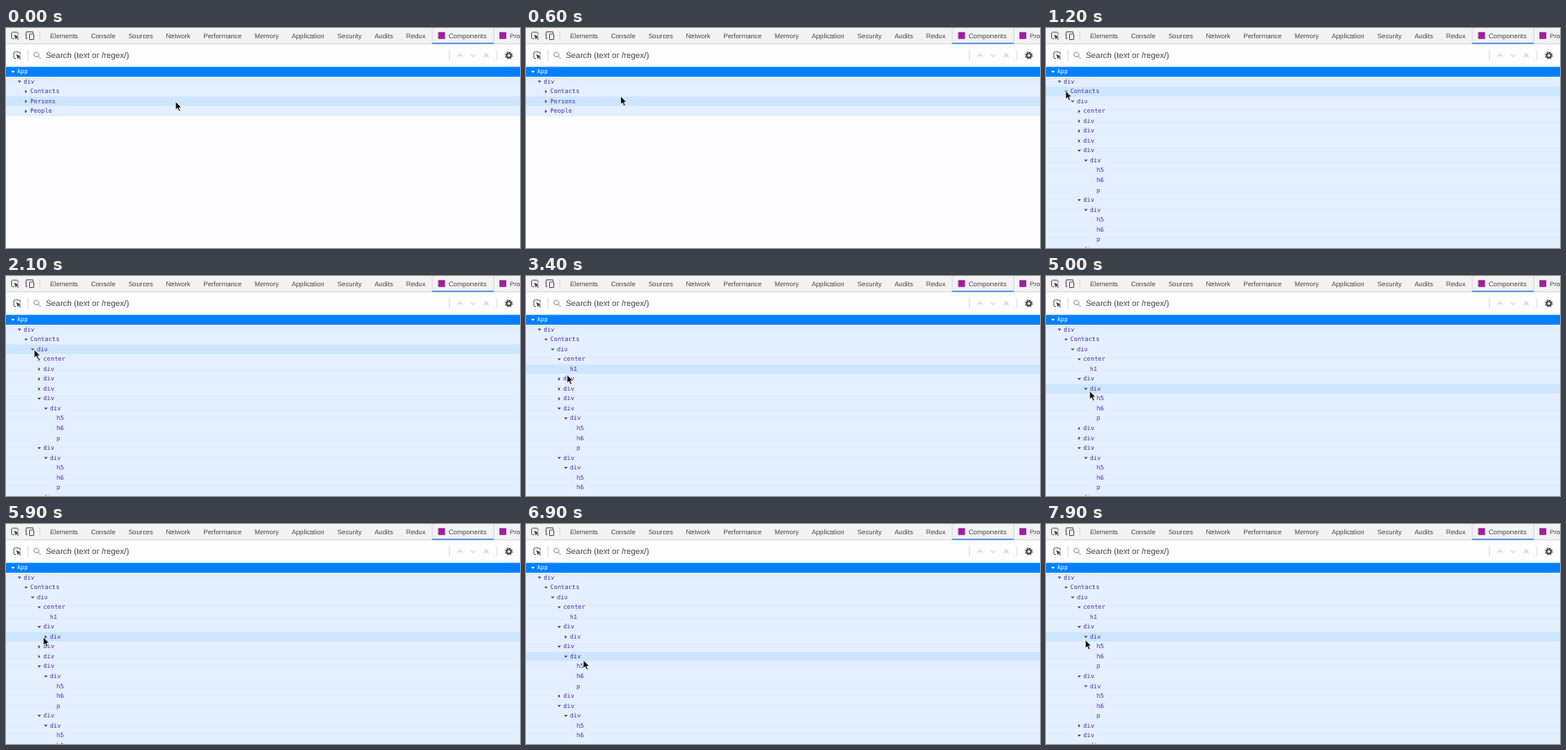
Write an HTML page that moves like this. It is 600 px wide and 257 px high and loops after 8000 ms.

```html
<!DOCTYPE html>
<html lang="en">
<head>
<meta charset="utf-8">
<title>Component tree</title>
<style>
  html, body { margin: 0; width: 100%; height: 100%; overflow: hidden; background: #fdfdff; }
  svg { display: block; width: 100vw; height: 100vh; }
  text { text-rendering: geometricPrecision; }
  .ui { font-family: "Liberation Sans", Arial, sans-serif; fill: #474749; }
  #tabs { font-size: 7.8px; }
  #tree { font: 7.12px "DejaVu Sans Mono", monospace; fill: #4f30a6; }
  .icon { fill: none; stroke: #5f6164; stroke-width: 1; }
  .pale { stroke: #bfc1c4; }
  .rule { stroke: #d0d0d2; stroke-width: .7; }
</style>
</head>
<body>
<svg viewBox="0 0 600 257">
  <defs>
    <g id="inspect">
      <path class="icon" d="M8 3.2V1.6Q8 .5 7 .5H1.5Q.5 .5 .5 1.5V7Q.5 8 1.5 8H3.2"/>
      <path d="M3.4 3.2L9.4 5.5 7 6.3 9 8.5 8.2 9.3 6.2 7.1 5.3 9.3Z" fill="#4c4e51"/>
    </g>
    <path id="chevron" class="icon pale" d="M-2.8 1.5L0 -1.5 2.8 1.5"/>
    <rect id="badge" width="8" height="8" fill="#a01e9c"/>
  </defs>

  <rect width="600" height="18.5" fill="#f3f3f4"/>
  <rect y="18" width="600" height=".8" fill="#cbcccf"/>
  <path class="rule" d="M497.5 0V18M569.5 0V18"/>
  <rect x="497.5" y="17.3" width="72" height="1.5" fill="#2b7de9"/>
  <rect y="18.8" width="600" height="27" fill="#fdfdfe"/>

  <use href="#inspect" x="6" y="4.5"/>
  <path class="icon" d="M25 12.5H23.5V4.5H31.5V6.5M27.5 7H32.5V13.5H27.5Z"/>
  <path class="rule" d="M39.5 4V14M25.5 26V38M517.5 26V38M573 26V38"/>
  <text id="tabs" class="ui" x="51.5" y="11.9"></text>
  <use href="#badge" x="504.5" y="4.8"/>
  <use href="#badge" x="576" y="4.8"/>

  <use href="#inspect" x="8.5" y="27.5"/>
  <g class="icon" style="stroke:#929497">
    <circle cx="35.5" cy="31" r="2.8"/><path d="M37.5 33L40.5 36"/>
  </g>
  <text class="ui" x="46.5" y="35.4" font-size="9.5">Search (text or /regex/)</text>
  <use href="#chevron" transform="translate(530.3 32)"/>
  <use href="#chevron" transform="translate(545.3 32) scale(1 -1)"/>
  <path class="icon pale" d="M558.2 29.5l5 5m0 -5l-5 5"/>
  <g fill="none" stroke="#55575a">
    <circle cx="587" cy="32" r="2.5" stroke-width="2"/>
    <circle cx="587" cy="32" r="3.8" stroke-width="1.4" stroke-dasharray="1.7 1.284"/>
  </g>

  <g id="tree"></g>
  <path id="cursor" d="M0 0V9.6L2.2 7.6 3.8 11.2 5.5 10.4 3.9 7H6.9Z" fill="#000" stroke="#fff" stroke-width=".7"/>
</svg>

<script>
const DURATION = 8000, STEP = 100, TRAVEL = 600;
const TOP = 45.4, ROW = 11.53, INDENT = 7.7;
const TAB_GAP = 15.15, BADGE_SPACE = 12;

const tabs = ["Elements", "Console", "Sources", "Network", "Performance", "Memory",
  "Application", "Security", "Audits", "Redux", "Components", "Profiler"];
const badged = ["Components", "Profiler"];

// Where the pointer comes to rest: arrival time, x, y
const stops = [[0, 198, 86], [900, 23, 73.5], [1800, 33, 86], [2900, 39, 97],
  [3400, 48, 115.5], [3900, 39, 120], [5000, 51, 134.5], [5200, 44, 131],
  [6400, 38, 146], [6600, 38, 146], [6900, 67, 159], [7700, 46, 135.5]];

const tree = document.getElementById("tree");
const cursor = document.getElementById("cursor");

document.getElementById("tabs").innerHTML = tabs.map((name, i) => {
  const gap = i && TAB_GAP + (badged.includes(name) ? BADGE_SPACE : 0);
  return `<tspan dx="${gap}">${name}</tspan>`;
}).join("");

function pointerAt(time) {
  const next = stops.findIndex(([arrival]) => arrival > time);
  if (next < 0) return stops.at(-1).slice(1);
  const [left, x0, y0] = stops[next - 1], [arrival, x1, y1] = stops[next];
  const start = Math.max(left, arrival - TRAVEL);
  const p = Math.max(0, (time - start) / (arrival - start));
  const eased = p * p * (3 - 2 * p);
  return [x0 + (x1 - x0) * eased, y0 + (y1 - y0) * eased];
}

const node = (name, children = [], open = true) => ({ name, children, open });

function card(open = true, innerOpen = true) {
  return node("div", [node("div", ["h5", "h6", "p"].map(tag => node(tag)), innerOpen)], open);
}

function treeAt(time) {
  const list = node("div", [
    node("center", [node("h1")], time >= 2900),
    card(time >= 3900, time < 5500 || time >= 7900),
    card(time >= 6700), card(false), card(), card(), card()
  ]);
  return node("App", [node("div", [
    node("Contacts", [list], time >= 1000),
    node("Persons", [node("div")], false),
    node("People", [node("div")], false)
  ])]);
}

function flatten(item, depth = 0) {
  const below = item.open ? item.children.flatMap(child => flatten(child, depth + 1)) : [];
  return [{ ...item, depth }, ...below];
}

function drawRow({ name, children, open, depth }, index, hovered) {
  const y = TOP + index * ROW, x = depth * INDENT, mid = y + ROW / 2;
  const selected = index === 0;
  const back = selected ? "#007ffb" : index === hovered ? "#cde6fe" : "#e3efff";
  const shape = open ? "M-2.1 -1.1H2.1L0 1.3Z" : "M-1.1 -2.1V2.1L1.3 0Z";
  const arrow = children.length
    ? `<path d="${shape}" transform="translate(${x + 8} ${mid})" fill="${selected ? "#fff" : "#47494f"}"/>` : "";
  return `<rect y="${y}" width="600" height="${ROW}" fill="${back}"/>${arrow}` +
    `<text x="${x + 12.8}" y="${mid + 2}"${selected ? ' fill="#fff"' : ""}>${name}</text>`;
}

let lastTime = -1;
function frame() {
  const time = Math.floor(performance.now() % DURATION / STEP) * STEP;
  if (time !== lastTime) {
    lastTime = time;
    // The row highlight trails the pointer by one step.
    const hovered = Math.floor((pointerAt(Math.max(0, time - STEP))[1] - TOP) / ROW);
    tree.innerHTML = flatten(treeAt(time)).slice(0, 19)
      .map((row, i) => drawRow(row, i, hovered)).join("");
    cursor.setAttribute("transform", `translate(${pointerAt(time)})`);
  }
  requestAnimationFrame(frame);
}
frame();
</script>
</body>
</html>
```
